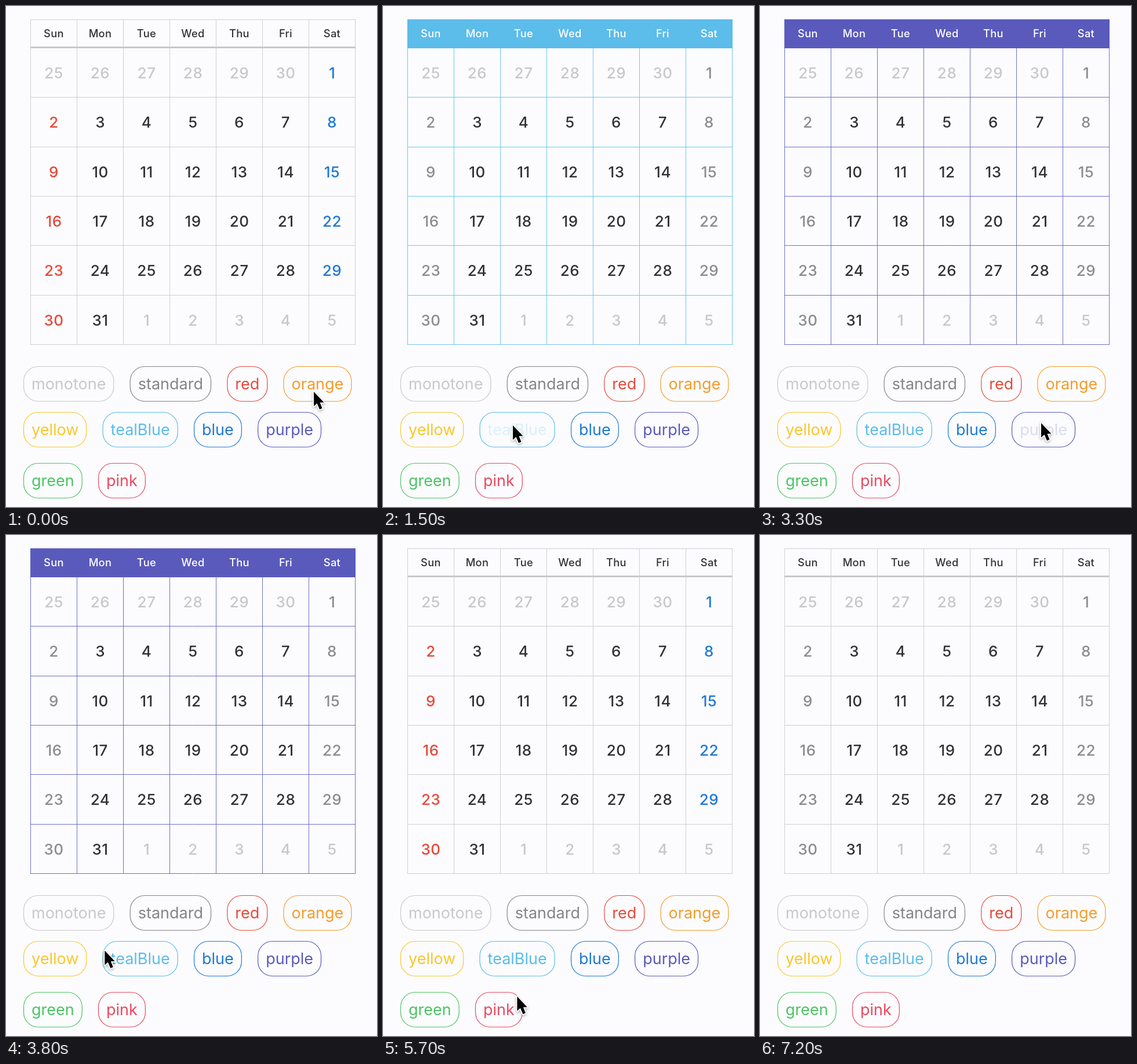
An HTML page with a canvas that plays this animation: 640x865 px, repeating every 7300 ms.

```html
<!DOCTYPE html>
<html lang="en">
<head>
<meta charset="utf-8">
<title>Calendar themes</title>
<style>
html, body { margin: 0; height: 100%; overflow: hidden; background: #fcfcfe; }
canvas { display: block; }
</style>
</head>
<body>
<canvas id="stage" width="640" height="865"></canvas>
<script>
const ctx = document.getElementById('stage').getContext('2d');
const LOOP = 7300, STEP = 100, DWELL = 100, FADE = 400;
const LEFT = 42, TOP = 23, HEAD = 72, COL = 80, ROW = 85.33;
const DARK = '#323234', GRAY = '#8c8c90', PALE = '#c8c8cc';
const WEEK = ['Sun', 'Mon', 'Tue', 'Wed', 'Thu', 'Fri', 'Sat'];

const COLORS = {
  monotone: PALE, standard: '#858589', red: '#e64a3a', orange: '#f49c2c',
  yellow: '#fbc62c', tealBlue: '#5cbcea', blue: '#1e79d5', purple: '#5a5abc',
  green: '#4cc464', pink: '#e84a60'
};
const PILL_ROWS = [
  [622.5, 'monotone', 'standard', 'red', 'orange'],
  [701.5, 'yellow', 'tealBlue', 'blue', 'purple'],
  [789.5, 'green', 'pink']
];

// time, chosen theme, pointer tip; the last stop is off stage
const STOPS = [
  [300, 'orange', 531, 666], [1400, 'tealBlue', 224, 724],
  [2400, 'green', 99, 815], [3300, 'purple', 485, 720],
  [4050, 'yellow', 100, 717], [4815, 'standard', 270, 630],
  [5900, 'pink', 230, 803], [6700, 'monotone', 110, 660],
  [LOOP, '', -30, 700]
];

function label(text, x, y, color, size, weight, spacing = 0) {
  ctx.font = `${weight} ${size}px Inter, sans-serif`;
  ctx.letterSpacing = spacing + 'px';
  ctx.fillStyle = color;
  ctx.fillText(text, x + spacing / 2, y);
}

function drawGrid(color) {
  const right = LEFT + 7 * COL + 1, bottom = HEAD + 6 * ROW + 1;
  ctx.strokeStyle = color;
  ctx.lineWidth = 1;
  ctx.globalAlpha = 0.85;
  ctx.beginPath();
  ctx.moveTo(LEFT, TOP + 0.5);
  ctx.lineTo(right, TOP + 0.5);
  for (let row = 0; row <= 6; row++) {
    const y = Math.round(HEAD + row * ROW) + 0.5;
    ctx.moveTo(LEFT, y);
    ctx.lineTo(right, y);
  }
  for (let col = 0; col <= 7; col++) {
    const x = LEFT + col * COL + 0.5;
    ctx.moveTo(x, TOP);
    ctx.lineTo(x, bottom);
  }
  ctx.stroke();
  ctx.globalAlpha = 1;
}

function dayColor(day, col, theme) {
  if (day < 1 || day > 31) return PALE;
  if (col % 6) return DARK;
  if (theme !== 'standard') return GRAY;
  return col ? COLORS.blue : COLORS.red;
}

function drawCalendar(theme) {
  const plain = theme === 'standard' || theme === 'monotone';
  drawGrid(plain ? PALE : COLORS[theme]);
  ctx.fillStyle = plain ? PALE : COLORS[theme];
  if (plain) ctx.fillRect(LEFT, HEAD - 2, 7 * COL + 1, 3);
  else ctx.fillRect(LEFT, TOP, 7 * COL + 1, HEAD - TOP + 1);

  const center = col => LEFT + (col + 0.5) * COL + 0.3;
  WEEK.forEach((day, col) =>
    label(day, center(col), 54, plain ? DARK : '#fff', 18.3, 500, 0.3));

  for (let i = 0; i < 42; i++) {
    const col = i % 7, row = Math.floor(i / 7), day = i - 5;
    const date = day < 1 ? day + 30 : (day - 1) % 31 + 1;
    label(date, center(col), 125 + row * ROW, dayColor(day, col, theme), 26, 500, 0.5);
  }
}

function pressAlpha(name, time) {
  const stop = STOPS.find(s => s[1] === name);
  if (!stop || time < stop[0] - DWELL) return 1;
  return Math.min(1, 0.2 + 0.8 * Math.max(0, time - stop[0] - DWELL) / FADE);
}

function drawPills(time) {
  for (const [y, ...names] of PILL_ROWS) {
    let x = 30.5;
    for (const name of names) {
      ctx.font = '400 27px Inter, sans-serif';
      ctx.letterSpacing = '0px';
      const width = ctx.measureText(name).width + 27;
      ctx.strokeStyle = COLORS[name];
      ctx.lineWidth = 1.2;
      ctx.beginPath();
      ctx.roundRect(x, y, width, 60, 25);
      ctx.stroke();
      ctx.globalAlpha = pressAlpha(name, time);
      label(name, x + width / 2, y + 39.5, COLORS[name], 27, 400);
      ctx.globalAlpha = 1;
      x += width + 28.3;
    }
  }
}

function pointerAt(time) {
  const next = STOPS.findIndex(s => s[0] - DWELL > time);
  if (next === 0) return STOPS[0].slice(2);
  const [t1, , x1, y1] = STOPS.at(next);
  if (next < 0) return [x1, y1];
  const [t0, , x0, y0] = STOPS[next - 1];
  const p = Math.max(0, (time - t0 - DWELL) / (t1 - t0 - 2 * DWELL));
  const eased = p * p * (3 - 2 * p);
  return [x0 + (x1 - x0) * eased, y0 + (y1 - y0) * eased];
}

function drawPointer(time) {
  const arrow = new Path2D('M0 0V25L5.5 20L10 30.5L14.5 28.5L10.5 18.5H17.5Z');
  ctx.save();
  ctx.translate(...pointerAt(time));
  ctx.strokeStyle = '#fff';
  ctx.lineWidth = 3.5;
  ctx.lineJoin = 'round';
  ctx.shadowColor = 'rgba(0, 0, 0, .3)';
  ctx.shadowBlur = 4;
  ctx.shadowOffsetY = 2;
  ctx.stroke(arrow);
  ctx.shadowColor = 'transparent';
  ctx.fillStyle = '#000';
  ctx.fill(arrow);
  ctx.restore();
}

function draw(now) {
  const time = Math.floor(now % LOOP / STEP) * STEP;
  const chosen = STOPS.findLast(s => s[0] <= time);
  ctx.fillStyle = '#fcfcfe';
  ctx.fillRect(0, 0, 640, 865);
  ctx.textAlign = 'center';
  drawCalendar(chosen ? chosen[1] : 'standard');
  drawPills(time);
  drawPointer(time);
  requestAnimationFrame(() => draw(performance.now() - start));
}

const start = performance.now();
draw(0);
</script>
</body>
</html>
```
